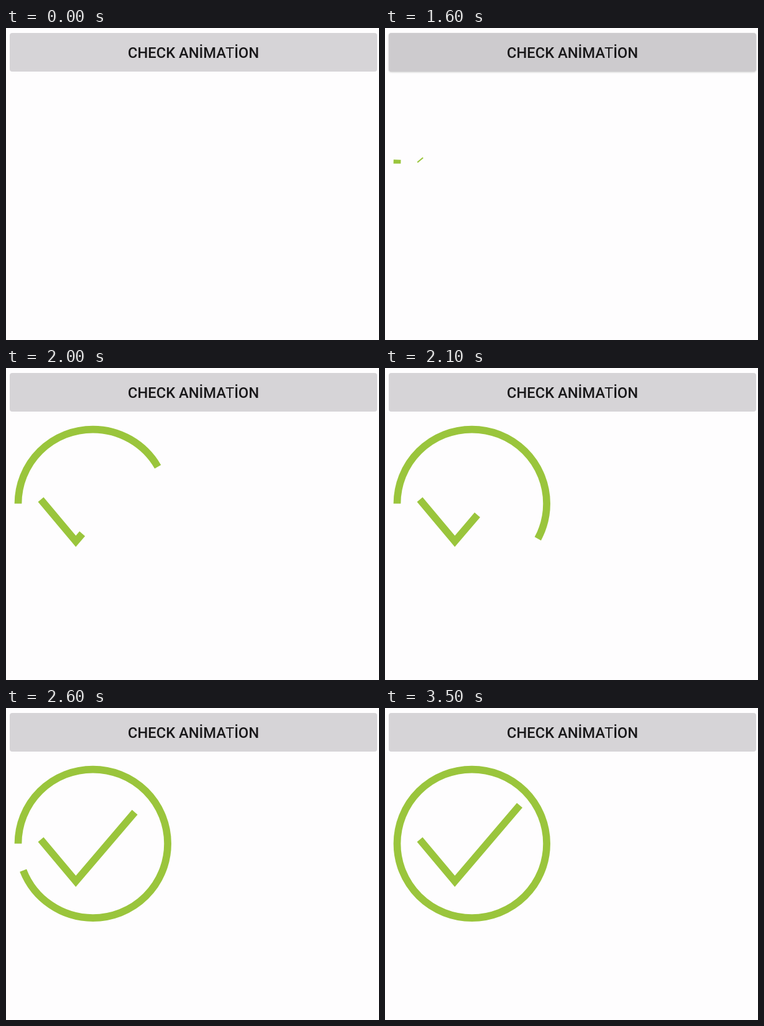
Recreate the animation shown at these times as an HTML page. Size 600 by 501 pixels, loop 3600 ms.

```html
<!DOCTYPE html>
<html lang="tr">
<head>
<meta charset="utf-8">
<title>Check animation</title>
<style>
  html, body { margin: 0; width: 100%; height: 100%; overflow: hidden; background: #fefdfe; }
  #button {
    position: absolute; left: 6px; top: 8px; width: 590.5px; height: 61.5px;
    border-radius: 4px; background: #d6d4d7;
  }
  svg { position: absolute; left: 0; top: 0; display: block; }
  text { font: 500 23.7px Roboto, sans-serif; fill: #19181a; text-anchor: middle; }
  .thin { font-weight: 400; }
  path { fill: none; stroke: #9ac53c; stroke-width: 11.7; stroke-miterlimit: 10; }
</style>
</head>
<body>
<div id="button"></div>
<svg width="600" height="501" viewBox="0 0 600 501">
  <text x="301.5" y="47.8">CHECK ANİMA<tspan class="thin" dx="-1">T</tspan>İON</text>
  <path pathLength="1" d="M19.5 217.8a120.3 119.3 0 0 1 240.6 0a120.3 119.3 0 0 1 -240.6 0z"/>
  <path pathLength="1" d="M56 211.2L112.3 278.3L216.6 156.3"/>
</svg>
<script>
  const LOOP = 3600, STEP = 100;
  const PRESS = 1500, DRAW_START = 1508, DRAW_TIME = 1545;
  // Button grey level and shadow strength for each step after the press
  const pressSteps = [[205, 0.28], [205, 0.2], [207, 0.1], [209, 0.04], [212, 0]];

  const button = document.getElementById('button');
  const strokes = document.querySelectorAll('path');

  // cubic-bezier(0.4, 0, 0.2, 1), solved by bisection
  function ease(x) {
    if (x <= 0) return 0;
    if (x >= 1) return 1;
    let lo = 0, hi = 1;
    for (let i = 0; i < 24; i++) {
      const s = (lo + hi) / 2, r = 1 - s;
      if (1.2 * r * r * s + 0.6 * r * s * s + s * s * s < x) lo = s;
      else hi = s;
    }
    return lo * lo * (3 - 2 * lo);
  }

  function drawButton(t) {
    const [grey, shadow] = pressSteps[(t - PRESS) / STEP] || [214, 0];
    button.style.background = `rgb(${grey}, ${grey - 2}, ${grey + 1})`;
    button.style.boxShadow = `0 1px 3px rgba(0, 0, 0, ${shadow})`;
  }

  function drawStrokes(t) {
    const done = ease((t - DRAW_START) / DRAW_TIME);
    for (const path of strokes) {
      path.style.visibility = done > 0 ? 'visible' : 'hidden';
      path.style.strokeDasharray = done < 1 ? `${done} 2` : 'none';
    }
  }

  function frame() {
    const t = Math.floor((performance.now() % LOOP) / STEP) * STEP;
    drawButton(t);
    drawStrokes(t);
    requestAnimationFrame(frame);
  }
  frame();
</script>
</body>
</html>
```
